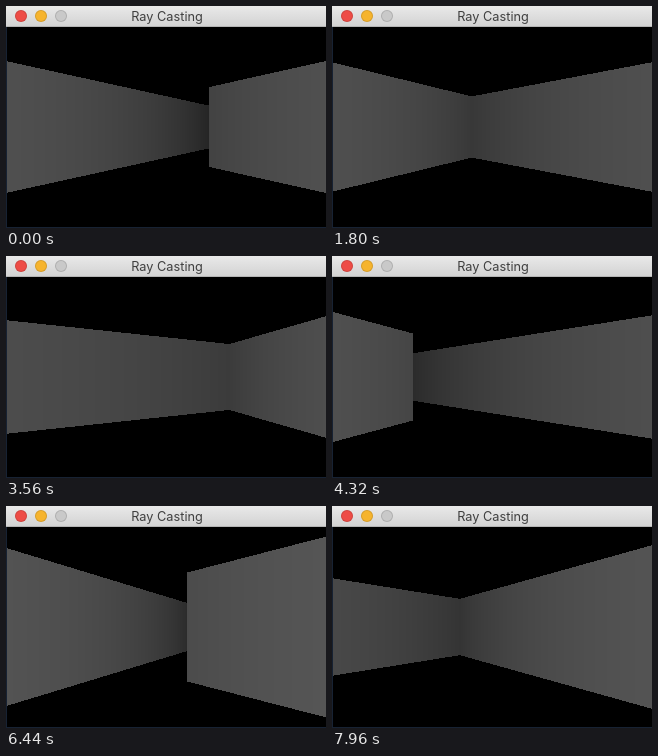
Animation, 320 px wide and 222 px high, one loop 8 s. Source, as an HTML page with a canvas:

```html
<!DOCTYPE html>
<html lang="en">
<head>
<meta charset="utf-8">
<title>Ray Casting</title>
<style>
  html, body { margin: 0; width: 100%; height: 100%; overflow: hidden; background: #000; }
  canvas { position: absolute; left: 0; top: 21px; }
  header {
    position: absolute; left: 0; top: 0; width: 320px; height: 21px; box-sizing: border-box;
    background: linear-gradient(#e9e9e9, #d3d3d3); border-bottom: 1px solid #b4b4b4;
    font: 12.75px/22px Inter, sans-serif; color: #404040; text-align: center; text-indent: 2px;
  }
  i {
    position: absolute; top: 4px; width: 12px; height: 12px; border-radius: 50%;
    box-shadow: inset 0 0 0 1px #0002;
  }
</style>
</head>
<body>
<header>
  <i style="left:9px;background:#ee4c46"></i>
  <i style="left:29px;background:#f6b42e"></i>
  <i style="left:49px;background:#c9c9c9"></i>
  Ray Casting
</header>
<canvas width="320" height="201"></canvas>
<script>
const ctx = document.querySelector('canvas').getContext('2d');
const LOOP = 8000, STEP = 40;
const FOCAL = 138, SCALE = 42.8, HORIZON = 100;
const PILLAR = 0.54; // half width of the wall with a passage on each side

// [time, heading in degrees]
const turn = [[640, -0.5], [1800, -82.2], [2760, -150.5], [4320, -256.1], [5480, -339.8],
  [5640, -351], [6520, -351], [7200, -397.4], [7960, -451]];
// [time, share of the walk forward]
const walk = [[5920, 0], [6520, 1]];

function at(keys, t) {
  if (t <= keys[0][0]) return keys[0][1];
  for (let i = 1; i < keys.length; i++) {
    const [t0, v0] = keys[i - 1], [t1, v1] = keys[i];
    if (t <= t1) return v0 + (v1 - v0) * (t - t0) / (t1 - t0);
  }
  return keys[keys.length - 1][1];
}

// Depth of the nearest wall of a room reaching from -1 to 1
function cast(px, py, dx, dy) {
  const tx = (Math.sign(dx) - px) / dx;
  const ty = (Math.sign(dy) - py) / dy;
  const open = dy > 0 && Math.abs(px + ty * dx) > PILLAR;
  return open ? tx : Math.min(tx, ty);
}

function draw(t) {
  const angle = (at(turn, t) + 45) * Math.PI / 180;
  const cos = Math.cos(angle), sin = Math.sin(angle);
  const k = at(walk, t);
  const px = 0.01 + 0.19 * k, py = 0.01 + 0.328 * k;

  ctx.fillStyle = '#000';
  ctx.fillRect(0, 0, 320, 201);
  for (let x = 0; x < 320; x++) {
    const u = (x + 0.5 - 160) / FOCAL;
    const depth = cast(px, py, cos - u * sin, sin + u * cos);
    const half = SCALE / depth;
    const top = Math.round(HORIZON - half), bottom = Math.round(HORIZON + half);
    const grey = Math.max(0, Math.round(100 - 31.5 * depth));
    ctx.fillStyle = `rgb(${grey},${grey},${grey})`;
    ctx.fillRect(x, top, 1, bottom - top);
  }
  // window edge
  ctx.fillStyle = '#172233';
  ctx.fillRect(0, 0, 1, 201);
  ctx.fillRect(0, 200, 320, 1);
}

function frame() {
  draw(Math.floor(performance.now() % LOOP / STEP) * STEP);
  requestAnimationFrame(frame);
}
frame();
</script>
</body>
</html>
```
